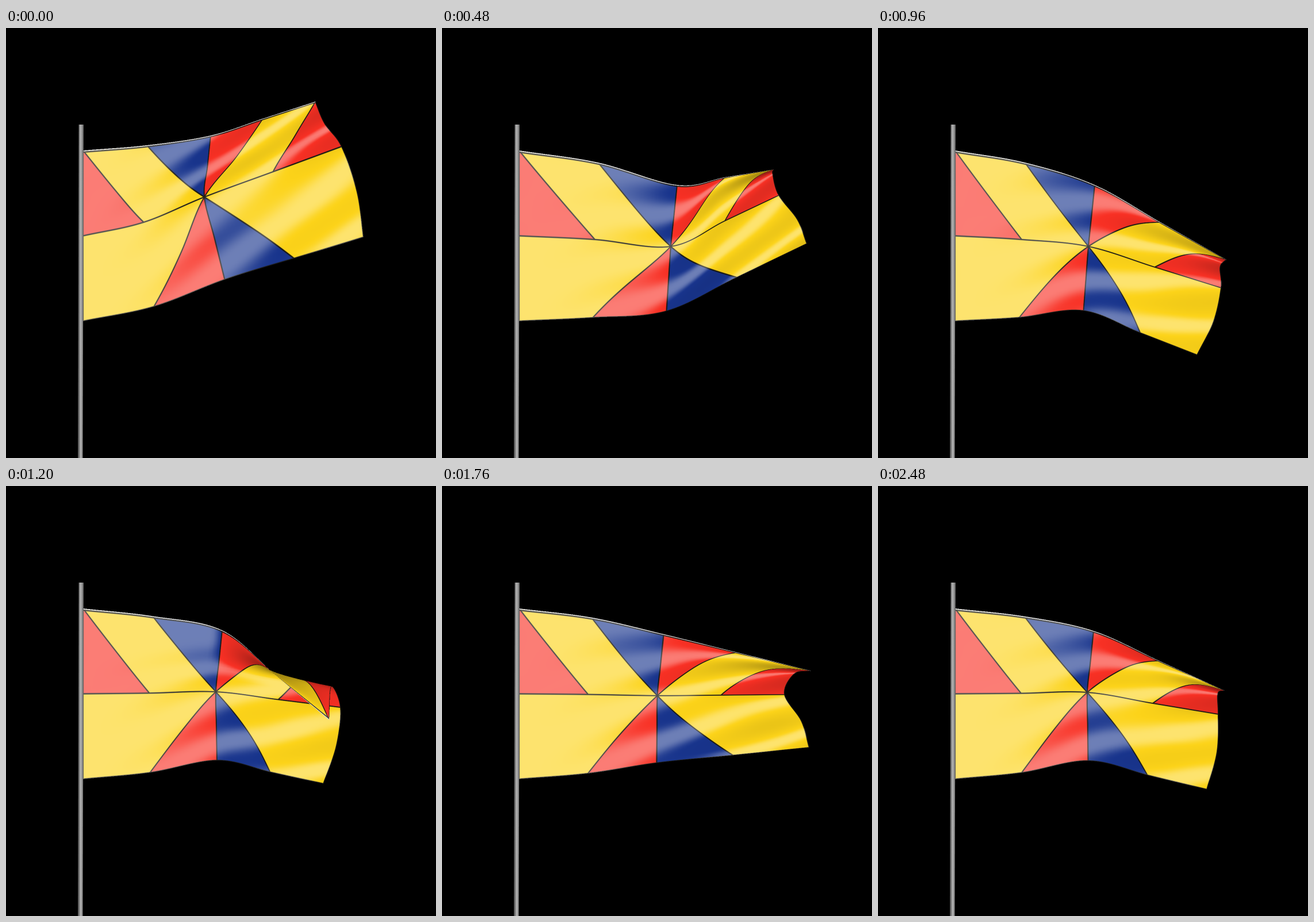
An HTML page with a canvas for the animation above (2560 ms loop, 748 px wide and 748 px high).

```html
<!DOCTYPE html>
<html lang="en">
<head>
<meta charset="utf-8">
<title>Waving flag</title>
<style>
html, body { margin: 0; width: 100%; height: 100%; overflow: hidden; background: #000; }
canvas { display: block; }
</style>
</head>
<body>
<canvas id="stage" width="748" height="748"></canvas>
<script>
const STEP = 80, LOOP = 2560;
const COLS = 64, ROWS = 40;
const SCALE = 2;
const BOX = { x: 120, y: 90, w: 550, h: 530 };
const W = BOX.w * SCALE, H = BOX.h * SCALE;
const HOIST = { x: 134, top: 213, middle: 362, height: 297 };

const YELLOW = [252, 211, 25], RED = [248, 48, 36], BLUE = [24, 52, 140];
const INK = [26, 26, 22], RIM = [205, 205, 205];

const clamp = x => Math.max(0, Math.min(1, x));
const smooth = x => { x = clamp(x); return x * x * (3 - 2 * x); };
const mix = (a, b, s) => a.map((p, k) => p + (b[k] - p) * s);
const add = (p, x, y) => [p[0] + x, p[1] + y];

function catmull(a, b, c, d, t) {
  return b + t / 2 * (c - a + t * (2 * a - 5 * b + 4 * c - d + t * (3 * (b - c) + d - a)));
}

// Spline through a list of vectors, s counted in points
function spline(points, s) {
  const last = points.length - 1;
  const i = Math.min(last - 1, Math.floor(s));
  const b = points[i], c = points[i + 1];
  const a = points[i - 1], d = points[i + 2];
  return b.map((p, k) => catmull(
    a ? a[k] : 2 * p - c[k], p, c[k], d ? d[k] : 2 * c[k] - p, s - i));
}

// Key points: centre of the flag, then top, middle and bottom of the free edge.
// The swing is an extra dip of the free edge on the way to the next pose.
const poses = [];
const pose = (time, swing, ...points) => poses.push({ time, swing, points: points.flat() });
pose(0, -30, [345, 294], [538, 128], [584, 206], [622, 364]);
pose(480, 55, [398, 380], [577, 246], [586, 291], [635, 375]);
pose(960, 0, [366, 380], [606, 403], [597, 452], [555, 569]);
pose(1200, 0, [365, 358], [562, 407], [582, 385], [552, 518]);
pose(1520, 0, [359, 344], [622, 313], [567, 357], [653, 433]);
pose(2000, 70, [388, 384], [648, 343], [623, 375], [608, 492]);
pose(2480, 0, [364, 359], [603, 356], [592, 397], [572, 528]);

function keyPoints(time) {
  const i = poses.findLastIndex((p, n) => p.time <= time && n < poses.length - 1);
  const s = (time - poses[i].time) / (poses[i + 1].time - poses[i].time);
  const flat = spline(poses.map(p => p.points), i + s);
  const dip = poses[i].swing * Math.sin(Math.PI * s);
  return [0, 2, 4, 6].map(k => add(flat.slice(k, k + 2), 0, k ? dip : dip / 4));
}

// Five columns of five points, drawn from the key points
function clothGrid(time) {
  const [centre, top, fly, bottom] = keyPoints(time);
  const slope = (centre[1] - HOIST.middle) / (centre[0] - HOIST.x);
  const topMid = add(centre, 11, -107);
  const bottomMid = add(centre, -110 * slope, 118 - 80 * slope);
  const crease = add(mix(top, fly, 0.5), -6, 0);
  crease[1] = Math.min(crease[1], fly[1] - 36);

  const pole = [0, 1, 2, 3, 4].map(r => [HOIST.x, HOIST.top + HOIST.height * r / 4]);
  const half = [topMid, mix(topMid, centre, 0.5), centre, mix(centre, bottomMid, 0.5), bottomMid];
  const free = [top, crease, fly, add(mix(fly, bottom, 0.5), 8, 0), bottom];
  // Near the pole the cloth leaves almost level; further out it hangs straight
  const quarter = pole.map((p, r) =>
    [(p[0] + half[r][0]) / 2, p[1] + (half[r][1] - p[1]) * 0.35]);
  const outer = half.map((p, r) => mix(p, free[r], 0.5));
  return [pole, quarter, half, outer, free];
}

// Ripples run outwards; a top corner that drops below its neighbours folds forward
function clothDepth(u, v, time, fold) {
  const phase = 10 * v + 6 * u - 1.2 - time / 1280 * 2 * Math.PI;
  const ripple = 17 * Math.pow(u, 0.7) * Math.sin(phase);
  const sweep = 6 * u * Math.sin(9 * u - 4 * v - time / 400);
  const corner = 75 * fold * smooth((u - 0.45) / 0.3) * smooth(1 - v / 0.4);
  return ripple * (1 - fold * smooth(1 - v / 0.4)) + sweep + corner;
}

function buildMesh(time) {
  const columns = clothGrid(time);
  const free = columns[4];
  const fold = smooth((free[0][1] - free[2][1] + 50) / 60);
  const mesh = [];
  for (let r = 0; r <= ROWS; r++) {
    const v = r / ROWS;
    const curve = columns.map(column => spline(column, v * 4));
    const row = [];
    for (let c = 0; c <= COLS; c++) {
      const u = c / COLS;
      const [x, y] = spline(curve, u * 4);
      row.push({ x, y, z: clothDepth(u, v, time, fold), u: u * 4, v: v * 2 });
    }
    mesh.push(row);
  }
  for (let r = 0; r <= ROWS; r++) for (let c = 0; c <= COLS; c++) {
    const l = mesh[r][Math.max(0, c - 1)], q = mesh[r][Math.min(COLS, c + 1)];
    const t = mesh[Math.max(0, r - 1)][c], b = mesh[Math.min(ROWS, r + 1)][c];
    const ax = q.x - l.x, ay = q.y - l.y, az = q.z - l.z;
    const bx = b.x - t.x, by = b.y - t.y, bz = b.z - t.z;
    const nx = ay * bz - az * by, ny = az * bx - ax * bz, nz = ax * by - ay * bx;
    mesh[r][c].facing = Math.abs(nz) / (Math.hypot(nx, ny, nz) || 1);
  }
  return mesh;
}

// The design is four units wide and two high
function fieldColor(u, v) {
  if (v < 1) {
    if (u < v) return RED;
    if (u < 1 + v) return YELLOW;
    if (u < 2) return BLUE;
    if (u < 3 - v) return RED;
    return u < 4 - v ? YELLOW : RED;
  }
  if (u < 3 - v) return YELLOW;
  if (u < 2) return RED;
  return u < 1 + v ? BLUE : YELLOW;
}

function seamDistance(u, v) {
  let diagonal = Math.min(Math.abs(u - 1 - v), Math.abs(u - 3 + v));
  if (v < 1) diagonal = Math.min(diagonal, Math.abs(u - v), Math.abs(u - 4 + v));
  return Math.min(diagonal * Math.SQRT1_2, Math.abs(u - 2), Math.abs(v - 1),
    u, 4 - u, Math.abs(v - 0.02), 2 - v);
}

const layer = document.createElement('canvas');
layer.width = W;
layer.height = H;
const layerCtx = layer.getContext('2d');
const image = layerCtx.createImageData(W, H);
const pixels = image.data;
const depth = new Float32Array(W * H);

function shadePixel(at, u, v, facing) {
  const rim = v * 140 < 1.6;
  const base = rim ? RIM : fieldColor(u, v);
  const ink = rim ? 0 : clamp(1.7 - seamDistance(u, v) * 140);
  const shine = 0.37 * smooth((facing - 0.89) / 0.11);
  const dim = 0.55 + 0.45 * Math.min(1, facing / 0.9);
  for (let k = 0; k < 3; k++) {
    const c = (base[k] + (INK[k] - base[k]) * ink) * dim;
    pixels[at + k] = c + (255 - c) * shine * (1 - 0.3 * ink);
  }
  pixels[at + 3] = 255;
}

function fillTriangle(a, b, c) {
  const ax = (a.x - BOX.x) * SCALE, ay = (a.y - BOX.y) * SCALE;
  const bx = (b.x - BOX.x) * SCALE, by = (b.y - BOX.y) * SCALE;
  const cx = (c.x - BOX.x) * SCALE, cy = (c.y - BOX.y) * SCALE;
  const area = (bx - ax) * (cy - ay) - (by - ay) * (cx - ax);
  if (Math.abs(area) < 1e-6) return;
  const x0 = Math.max(0, Math.floor(Math.min(ax, bx, cx)));
  const x1 = Math.min(W - 1, Math.ceil(Math.max(ax, bx, cx)));
  const y0 = Math.max(0, Math.floor(Math.min(ay, by, cy)));
  const y1 = Math.min(H - 1, Math.ceil(Math.max(ay, by, cy)));
  for (let y = y0; y <= y1; y++) for (let x = x0; x <= x1; x++) {
    const px = x + 0.5, py = y + 0.5;
    const i = ((bx - px) * (cy - py) - (by - py) * (cx - px)) / area;
    const j = ((cx - px) * (ay - py) - (cy - py) * (ax - px)) / area;
    const k = 1 - i - j;
    if (i < -1e-6 || j < -1e-6 || k < -1e-6) continue;
    const z = i * a.z + j * b.z + k * c.z;
    const at = y * W + x;
    if (z <= depth[at]) continue;
    depth[at] = z;
    shadePixel(at * 4, i * a.u + j * b.u + k * c.u, i * a.v + j * b.v + k * c.v,
      i * a.facing + j * b.facing + k * c.facing);
  }
}

const ctx = document.getElementById('stage').getContext('2d');

function drawPole() {
  const shade = ctx.createLinearGradient(126, 0, 135, 0);
  shade.addColorStop(0, '#555');
  shade.addColorStop(0.4, '#b4b4b4');
  shade.addColorStop(0.65, '#999');
  shade.addColorStop(1, '#5c5c5c');
  ctx.fillStyle = shade;
  ctx.beginPath();
  ctx.moveTo(126.5, 168);
  ctx.lineTo(135, 168);
  ctx.lineTo(133.5, 748);
  ctx.lineTo(125, 748);
  ctx.fill();
}

function draw(time) {
  pixels.fill(0);
  depth.fill(-1e9);
  const mesh = buildMesh(time);
  for (let r = 0; r < ROWS; r++) for (let c = 0; c < COLS; c++) {
    const a = mesh[r][c], b = mesh[r][c + 1], d = mesh[r + 1][c], e = mesh[r + 1][c + 1];
    fillTriangle(a, b, d);
    fillTriangle(b, e, d);
  }
  layerCtx.putImageData(image, 0, 0);
  ctx.fillStyle = '#000';
  ctx.fillRect(0, 0, 748, 748);
  ctx.drawImage(layer, BOX.x, BOX.y, BOX.w, BOX.h);
  drawPole();
}

const start = performance.now();
let shown = -1;
function tick() {
  const time = Math.floor((performance.now() - start) % LOOP / STEP) * STEP;
  if (time !== shown) draw(shown = time);
  requestAnimationFrame(tick);
}
tick();
</script>
</body>
</html>
```
